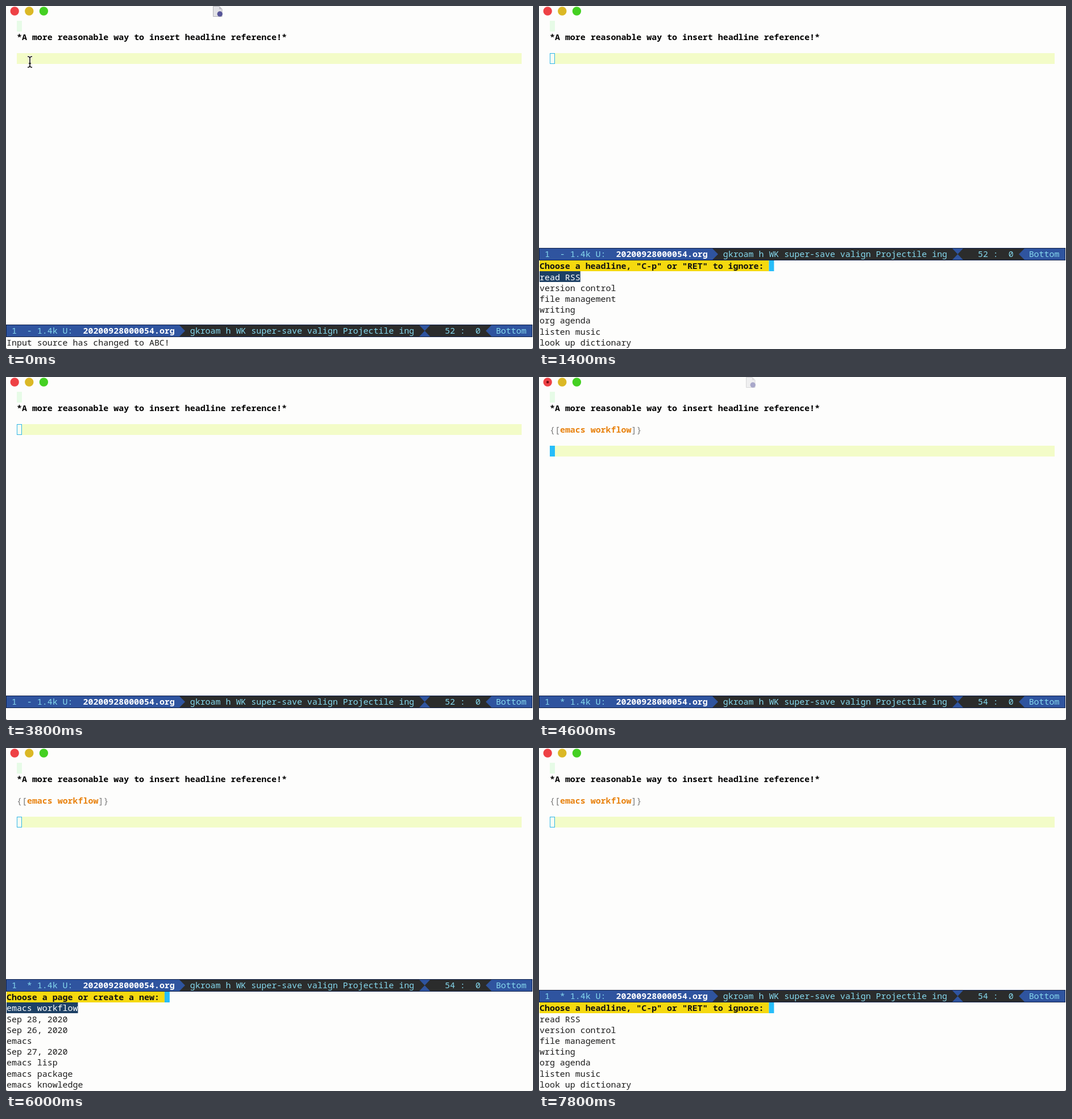
These frames come from a looping animation (927x604 px, 8000 ms). An HTML page:

```html
<!DOCTYPE html>
<html lang="en">
<head>
<meta charset="utf-8">
<title>Inserting a headline reference</title>
<style>
html, body { margin: 0; width: 100%; height: 100%; overflow: hidden; background: #fdfdfc; }
svg { display: block; width: 927px; height: 604px; }
text { white-space: pre; font-family: "Noto Sans Mono", monospace; font-size: 14.94px; }
</style>
</head>
<body>
<svg id="stage" viewBox="0 0 927 604"></svg>
<script>
const LOOP = 8000, COL = 8.965, ROW = 19.2, ASCENT = 14.8;
const INK = '#1c1c1c', CYAN = '#86d9ee', BLUE = '#2f549f', DARK = '#2b2c2c', CURSOR = '#27bdfa';
const stage = document.getElementById('stage');

const PAGES = {
  prompt: 'Choose a page or create a new: ',
  items: ['emacs workflow', 'Sep 28, 2020', 'Sep 26, 2020', 'emacs', 'Sep 27, 2020',
    'emacs lisp', 'emacs package', 'emacs knowledge']
};
const HEADLINES = {
  prompt: 'Choose a headline, "C-p" or "RET" to ignore: ',
  items: ['read RSS', 'version control', 'file management', 'writing', 'org agenda',
    'listen music', 'look up dictionary']
};
const NO_LIST = { prompt: '', items: [] };

// Each scene holds from its start time (ms) until the next one.
const SCENES = [
  { at: 0, icon: 1, mouse: true, cursor: 'off', echo: 'Input source has changed to ABC!' },
  { at: 200, icon: 1, mouse: true, cursor: 'solid', echo: 'Input source has changed to ABC!' },
  { at: 600, list: PAGES, selected: 0 },
  { at: 1400, list: HEADLINES, selected: 0 },
  { at: 2400, list: HEADLINES },
  { at: 3600 },
  { at: 4200, icon: 0.5, inserted: true, cursor: 'solid' },
  { at: 4700, icon: 0.5, inserted: true, cursor: 'off' },
  { at: 5200, icon: 0.5, inserted: true, cursor: 'solid' },
  { at: 5600, inserted: true, list: PAGES, selected: 0 },
  { at: 6800, inserted: true, list: HEADLINES, selected: 0 },
  { at: 7600, inserted: true, list: HEADLINES }
];

const escapeText = s => s.replace(/&/g, '&amp;').replace(/</g, '&lt;');
const rect = (x, y, w, h, fill) => `<rect x="${x}" y="${y}" width="${w}" height="${h}" fill="${fill}"/>`;
const circle = (x, y, r, fill) => `<circle cx="${x}" cy="${y}" r="${r}" fill="${fill}"/>`;
const shape = (d, fill) => `<path d="${d}" fill="${fill}"/>`;
const label = (x, top, s, fill = INK, weight = 400) =>
  `<text x="${x}" y="${top + ASCENT}" font-weight="${weight}" fill="${fill}">${escapeText(s)}</text>`;
const cells = (x, top, count, fill) => rect(x, Math.floor(top), count * COL, 19, fill);

function titleBar({ icon, inserted }) {
  let out = circle(15.2, 9, 7.7, '#ee4145') + circle(40.8, 9, 7.7, '#dbb825') + circle(66.4, 9, 7.7, '#44d022');
  if (icon && inserted) out += circle(15.2, 9, 2.3, '#730b10');
  if (icon) {
    out += `<g opacity="${icon}">` +
      '<path d="M364.5 .5H375L380 5.5V18.5H364.5Z" fill="#e2e2e6" stroke="#b4b4b9"/>' +
      shape('M375 .5V5.5H380Z', '#bcbcc2') + circle(376.2, 14, 4.7, '#575599') + '</g>';
  }
  return out;
}

function buffer({ inserted, cursor, mouse }) {
  const y = inserted ? 121 : 83;
  let out = rect(19, 26, 9, 19, '#e7fbe7') +
    label(19, 45, '*A more reasonable way to insert headline reference!*', '#000', 700) +
    rect(19, y, 888, 19, '#f3fcc8');
  if (inserted) {
    out += label(19, 83, '{[', '#777') +
      label(19 + 2 * COL, 83, 'emacs workflow', '#e8820f', 700) +
      label(19 + 16 * COL, 83, ']}', '#777');
  }
  if (cursor === 'solid') out += rect(19, y, 9, 19, CURSOR);
  if (!cursor) out += `<rect x="19.5" y="${y + 0.5}" width="8" height="18" fill="#fdfdf4" stroke="#2eb6e6"/>`;
  if (mouse) {
    const beam = 'M38 89Q42 89 42 92Q42 89 46 89M42 91V106M38 108Q42 108 42 105Q42 108 46 108M40 101H44';
    out += `<path d="${beam}" fill="none" stroke="#fff" stroke-width="3.5"/>` +
      `<path d="${beam}" fill="none" stroke="#111" stroke-width="1.6"/>`;
  }
  return out;
}

function modeLine(y, inserted) {
  const top = y + 1, mid = y + 11, bottom = y + 21;
  const at = (col, s, fill = CYAN, weight = 400) => label(1 + col * COL, y + 1.4, s, fill, weight);
  return rect(0, y, 926, 22, '#10214a') +
    rect(1, top, 924, 20, DARK) +
    shape(`M1 ${top}H305L315 ${mid}L305 ${bottom}H1Z`, BLUE) +
    shape(`M727 ${top}H746L727 ${bottom}H746Z`, BLUE) +
    shape(`M925 ${top}H854L844 ${mid}L854 ${bottom}H925Z`, BLUE) +
    at(1, `1  ${inserted ? '*' : '-'} 1.4k U:`) +
    at(15, '20200928000054.org', '#fff', 700) +
    at(36, 'gkroam h WK super-save valign Projectile ing') +
    at(86, `${inserted ? 54 : 52} :  0`) +
    at(96, 'Bottom');
}

function minibuffer({ list = NO_LIST, selected, echo = '', inserted }) {
  const { prompt, items } = list;
  const rise = items.length * ROW;
  const top = 583 - rise;
  let out = modeLine(Math.floor(561 - rise), inserted);
  if (prompt) {
    out += cells(1, top, prompt.length, '#f5d90f') +
      cells(1 + prompt.length * COL, top, 1, CURSOR) +
      label(1, top, prompt, '#111', 700);
  }
  items.forEach((item, i) => {
    const y = top + (i + 1) * ROW;
    const active = i === selected;
    if (active) out += cells(1, y, item.length, '#1d4065');
    out += label(1, y, item, active ? '#fff' : INK);
  });
  return out + label(1, 583, echo);
}

function draw(scene) {
  stage.innerHTML = rect(0, 0, 927, 604, '#fdfdfc') +
    titleBar(scene) + buffer(scene) + minibuffer(scene) +
    shape('M0 601Q0 604 3 604H0ZM927 601Q927 604 924 604H927Z', '#444');
}

let shown;
function tick() {
  const t = performance.now() % LOOP;
  const scene = SCENES.findLast(s => s.at <= t);
  if (scene !== shown) draw(shown = scene);
  requestAnimationFrame(tick);
}
tick();
</script>
</body>
</html>
```
